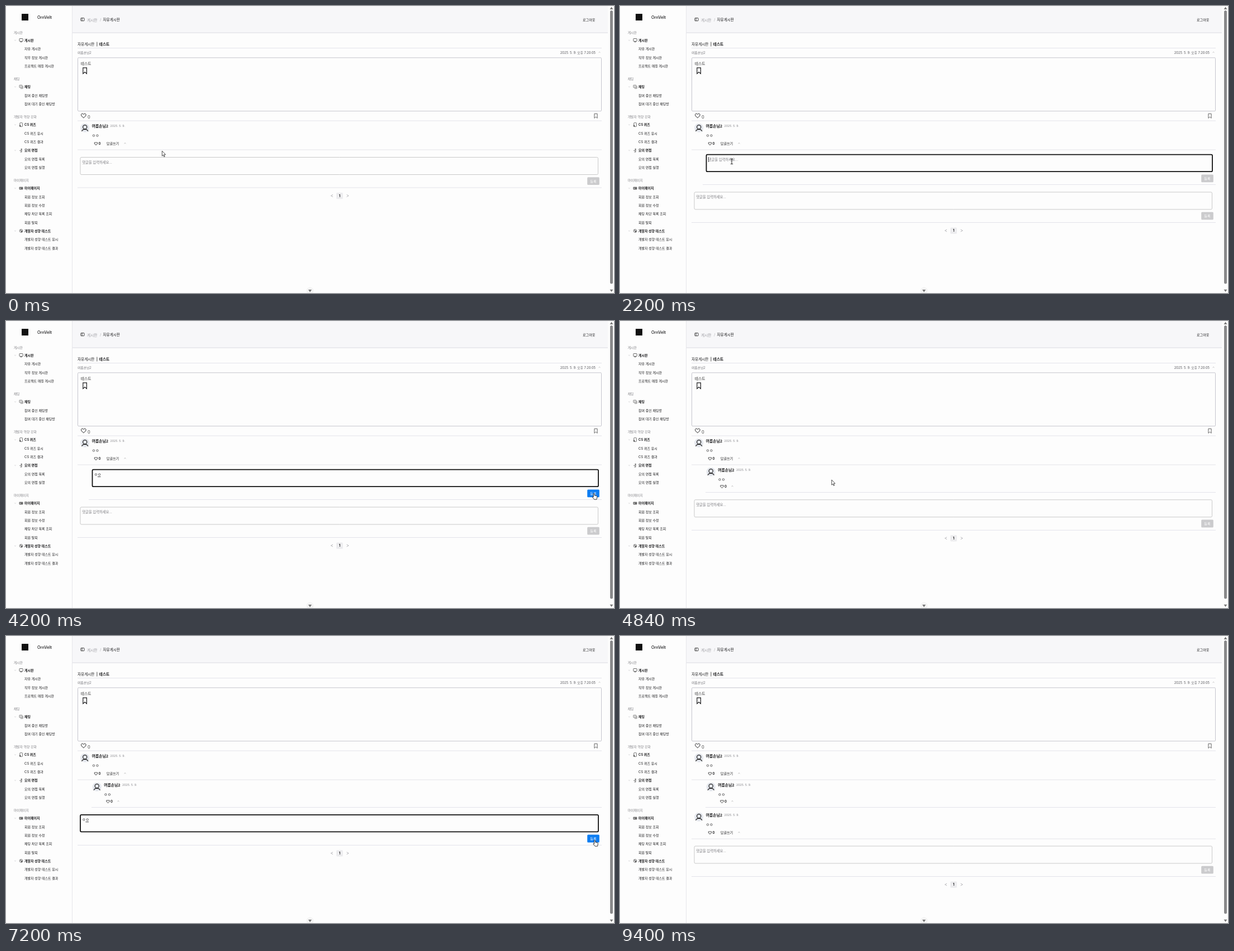
These frames come from a looping animation (1088x515 px, 9.48 s). An HTML page with a canvas:

```html
<!DOCTYPE html>
<html lang="ko">
<head>
<meta charset="utf-8">
<title>자유게시판</title>
<style>
html, body { margin: 0; width: 100%; height: 100%; overflow: hidden; background: #fdfdfd; }
canvas { display: block; width: 1088px; height: 515px; }
</style>
</head>
<body>
<canvas id="stage"></canvas>
<script>
const W = 1088, H = 515, LOOP = 9480;
const FONT = 'Inter, "Noto Sans CJK KR", "Noto Sans CJK JP", "Noto Sans CJK", sans-serif';
const INK = '#1c1c1e', GREY = '#85858a', LINE = '#e3e3ea';
const USER = '여름손님2', HINT = '댓글을 입력하세요...';

const canvas = document.getElementById('stage');
const dpr = window.devicePixelRatio || 1;
canvas.width = W * dpr;
canvas.height = H * dpr;
const c = canvas.getContext('2d');

// Event times in ms
const AT = {
  openReply: 1250, focusReply: 1850, reply1: 3450, reply2: 3740, sendReply: 4300,
  focusMain: 5350, main1: 5900, main2: 6150, sendMain: 7520
};

// Pointer path: time, x, y
const PATH = [
  [0, 279, 260], [120, 279, 260], [700, 189.5, 271.5], [950, 190, 247], [1350, 190, 247],
  [1750, 200, 279], [3250, 200, 279], [3640, 576, 306.5], [3930, 1066, 311],
  [4100, 1052, 309], [4380, 1052, 309], [4840, 378.5, 285], [5200, 215, 333],
  [6250, 215, 333], [6700, 1072, 372], [6950, 1053.5, 366], [7800, 1053.5, 366],
  [8300, 960, 260], [8700, 640, 8], [8850, 600, -20]
];

// ---- helpers ----
function text(s, x, y, size, color = INK, weight = 400, align = 'left') {
  c.font = `${weight} ${size}px ${FONT}`;
  c.textAlign = align;
  c.fillStyle = color;
  c.fillText(s, x, y + size * 0.375);
}

function rect(x, y, w, h, color) {
  c.fillStyle = color;
  c.fillRect(x, y, w, h);
}

function round(x, y, w, h, r, fill, stroke, lw = 1) {
  c.beginPath();
  c.roundRect(x, y, w, h, r);
  paint(fill, stroke, lw);
}

function paint(fill, stroke, lw = 1) {
  if (fill) { c.fillStyle = fill; c.fill(); }
  if (stroke) { c.strokeStyle = stroke; c.lineWidth = lw; c.stroke(); }
}

function poly(pts, fill, stroke, lw, close = true) {
  c.beginPath();
  pts.forEach(([x, y]) => c.lineTo(x, y));
  if (close) c.closePath();
  paint(fill, stroke, lw);
}

function circle(x, y, r, fill, stroke, lw) {
  c.beginPath();
  c.arc(x, y, r, 0, Math.PI * 2);
  paint(fill, stroke, lw);
}

function at(x, y, draw, scale = 1) {
  c.save();
  c.translate(x, y);
  c.scale(scale, scale);
  draw();
  c.restore();
}

const rule = (y, x = 128) => rect(x, y - 0.5, 1066 - x, 1, LINE);

function heart(x, y, w, lw) {
  at(x, y, () => {
    c.beginPath();
    c.moveTo(0, 4);
    c.bezierCurveTo(-2, 2.2, -4.4, 0.6, -4.4, -1.5);
    c.bezierCurveTo(-4.4, -4, -1.2, -4.6, 0, -2.3);
    c.bezierCurveTo(1.2, -4.6, 4.4, -4, 4.4, -1.5);
    c.bezierCurveTo(4.4, 0.6, 2, 2.2, 0, 4);
    paint(null, INK, lw * 8.8 / w);
  }, w / 8.8);
}

function bookmark(x, y, w, h, color, lw) {
  poly([[x, y], [x + w, y], [x + w, y + h], [x + w / 2, y + h * 0.72], [x, y + h]], null, color, lw);
}

function chevron(x, y, color, flip = 1) {
  poly([[x - 1.5, y - 0.7 * flip], [x, y + 0.7 * flip], [x + 1.5, y - 0.7 * flip]], null, color, 0.7, false);
}

// ---- sidebar ----
const ICONS = {
  board() {
    round(-3, -3, 6.2, 4.8, 0.6, null, '#444', 0.8);
    rect(-1.6, 2.7, 3.4, 0.8, '#444');
  },
  chat() {
    round(-3, -3, 5, 4.4, 0.6, null, '#555', 0.7);
    poly([[3.2, -1.2], [3.2, 3], [-1, 3]], null, '#555', 0.7, false);
    rect(-1.7, -1.3, 2.4, 0.7, '#555');
  },
  quiz() {
    round(-2.2, -3.4, 4.6, 6.8, 0.6, null, '#555', 0.8);
    rect(-2.6, 0.6, 1.8, 2.8, '#444');
  },
  mic() {
    circle(0.7, -1.9, 1.2, '#555');
    poly([[-2.6, 0.4], [1.6, 0.4], [0, 3]], null, '#555', 0.9, false);
    rect(-1.5, 2.6, 3, 0.8, '#555');
  },
  card() {
    round(-3.4, -2.2, 6.8, 4.4, 0.6, '#555');
    rect(-2.4, -0.9, 2, 1.8, '#ddd');
    rect(0.5, -0.6, 2, 0.7, '#ddd');
  },
  mind() {
    circle(0, 0, 2.8, '#e4e4e4', '#555', 0.7);
    poly([[-1.4, -2], [0, 0], [1.2, 2.6], [2, -0.5]], null, '#333', 0.9, false);
  }
};

const MENU = [
  [47.5, '게시판'],
  [61.5, '게시판', 'board', ['자유 게시판', '직무 정보 게시판', '프로젝트 매칭 게시판']],
  [131, '채팅'],
  [145, '채팅', 'chat', ['참여 중인 채팅방', '참여 대기 중인 채팅방']],
  [199, '개발자 역량 강화'],
  [213, 'CS 퀴즈', 'quiz', ['CS 퀴즈 응시', 'CS 퀴즈 결과']],
  [259, '모의 면접', 'mic', ['모의 면접 목록', '모의 면접 실행']],
  [313, '마이페이지'],
  [327, '마이페이지', 'card', ['회원 정보 조회', '회원 정보 수정', '채팅 차단 목록 조회', '회원 탈퇴']],
  [403.5, '개발자 성향 테스트', 'mind', ['개발자 성향 테스트 응시', '개발자 성향 테스트 결과']]
];

function sidebar() {
  rect(118, 0, 1, H, '#e6e6ea');
  rect(28, 14, 12, 12, '#111');
  text('OrnVelt', 56, 20.5, 7.3, INK, 500);
  for (const [y, label, icon, items] of MENU) {
    if (!icon) {
      text(label, 13.7, y, 5.9, GREY);
      continue;
    }
    chevron(16.5, y, '#c4c4c8');
    at(27, y, ICONS[icon]);
    text(label, 33, y, 6, INK, 600);
    items.forEach((s, i) => text(s, 33, y + 15.4 * (i + 1), 6));
  }
}

// ---- page ----
function header() {
  rect(119, 0, 958, 48, '#f7f7f9');
  rect(119, 47.5, 958, 1, '#dcdce2');
  round(133.8, 21.5, 6.2, 5.2, 0.8, null, '#333', 0.9);
  rect(135.6, 21.5, 0.9, 5.2, '#333');
  text('게시판', 145, 25, 6.7, '#9a9aa0');
  text('/', 168, 25, 6.5, '#b0b0b4');
  text('자유게시판', 173.5, 25, 6.6, INK, 500);
  text('로그아웃', 1032, 25, 6.1, INK, 500);
}

function post() {
  text('자유게시판', 128, 68.5, 6.6, INK, 500);
  rect(162.4, 64.5, 0.9, 8, '#444');
  text('테스트', 166.8, 68.5, 6.7, INK, 700);
  rule(75.5);
  text(USER, 128, 83.5, 5.8, '#77777c');
  text('2025. 5. 9. 오후 7:20:05', 1055, 83.5, 5.75, '#55555a', 400, 'right');
  chevron(1062, 83, '#aaa', -1);
  round(128.5, 92.8, 937, 95.8, 1.5, '#fdfdfd', '#c6c6ce');
  text('테스트', 133.8, 103.5, 6.8, '#333');
  bookmark(137.8, 110.8, 6.6, 10.6, INK, 1.2);
  heart(138.8, 196.8, 8.6, 1);
  text('0', 146, 199, 7.5, '#444');
  bookmark(1052.9, 193.3, 5.2, 8, '#555', 0.9);
  rule(206);
}

function avatar(x, y) {
  circle(x, y, 8, '#e4e7ed');
  c.beginPath();
  c.arc(x, y - 1.4, 3.6, 0, Math.PI * 2);
  c.moveTo(x - 5.6, y + 6.2);
  c.bezierCurveTo(x - 4.4, y + 1.6, x + 4.4, y + 1.6, x + 5.6, y + 6.2);
  paint(null, '#222', 1.2);
}

function comment(dx, dy, nested) {
  const y = dy + (nested ? -2 : 0);
  avatar(141.2 + dx, 218.7 + dy);
  text(USER, 153.8 + dx, 215.8 + dy, 6.8, INK, 700);
  text('2025. 5. 9.', 186.5 + dx, 215.5 + dy, 5.3, GREY);
  text('ㅇㅇ', 153.8 + dx, 232.3 + dy, 6.9, INK);
  heart(161 + dx, 247 + y, 5.6, 0.9);
  text('0', 165.4 + dx, 247 + y, 6, INK, 600);
  if (!nested) text('답글쓰기', 179.8 + dx, 247 + y, 6.1, INK, 500);
  chevron((nested ? 179.5 : 213) + dx, 246.3 + y, '#999', -1);
}

// Text area with its submit button
function form(x, y, { focus, value = '', composing, ready, caret }) {
  if (focus) round(x + 0.5, y, 1059.5 - x, 30.5, 2, '#fdfdfd', '#111', 1.8);
  else round(x + 0.5, y, 1059 - x, 31, 2, '#fdfdfd', '#c9c9c9');
  const tx = x + 3.7, ty = y + 8.8;
  if (value) {
    text(value, tx, ty, 6.9);
    if (composing) rect(tx + 6.2, ty + 3.7, 5.6, 0.8, INK);
  } else {
    text(HINT, tx, ty, 6.3, '#7c7c80');
  }
  if (caret) rect(tx + value.length * 6.35 + 0.2, ty - 4.5, 0.8, 9, INK);
  round(1040.2, y + 35.8, 21.6, 13.8, 1.5, ready ? '#0d7df2' : '#cbcbcd');
  text('등록', 1051, y + 42.9, 6.2, '#fff', 500, 'center');
}

function pager(y) {
  poly([[585, y - 2], [581.4, y], [585, y + 2]], null, '#a5a5aa', 0.8, false);
  round(591.2, y - 5.6, 11.6, 11.4, 1.5, '#ececee');
  text('1', 597, y + 0.2, 6, INK, 700, 'center');
  poly([[609.6, y - 2], [613.2, y], [609.6, y + 2]], null, '#a5a5aa', 0.8, false);
}

function chrome() {
  rect(1077, 0, 11, H, '#fcfcfc');
  round(1081, 8, 5, 490.5, 2.5, '#88888a');
  poly([[1080.6, 6], [1083.5, 1.6], [1086.4, 6]], '#777');
  poly([[1080.6, 508.7], [1083.5, 513], [1086.4, 508.7]], '#777');
  circle(544, 511, 6.5, '#f4f4f4');
  poly([[541, 509], [547, 509], [544, 513.4]], '#777');
}

// ---- pointer ----
function pointerAt(t) {
  const i = PATH.findIndex(k => k[0] > t);
  if (i < 0) return PATH[PATH.length - 1].slice(1);
  const [t0, x0, y0] = PATH[i - 1], [t1, x1, y1] = PATH[i];
  const u = (t - t0) / (t1 - t0), e = u * u * (3 - 2 * u);
  return [x0 + (x1 - x0) * e, y0 + (y1 - y0) * e];
}

function arrow(x, y) {
  at(x, y, () => poly([[0.3, 0], [0.3, 9.2], [2.4, 7.3], [3.8, 10.6], [5.2, 10], [3.8, 6.8], [6.5, 6.6]],
    '#fff', '#222', 0.8));
}

function beam(x, y) {
  rect(x - 0.5, y - 4.5, 1, 9, '#222');
  rect(x - 2.2, y - 5, 4.4, 0.9, '#222');
  rect(x - 2.2, y + 4.1, 4.4, 0.9, '#222');
}

function hand(x, y) {
  at(x, y, () => {
    c.beginPath();
    c.moveTo(-0.8, 7);
    c.lineTo(-0.8, 0.8);
    c.quadraticCurveTo(0.2, -0.6, 1.2, 0.8);
    c.lineTo(1.2, 4);
    c.lineTo(4.6, 4.6);
    c.quadraticCurveTo(6, 5, 5.8, 7);
    c.lineTo(5, 11.2);
    c.lineTo(0.6, 11.2);
    c.lineTo(-2.8, 7);
    c.quadraticCurveTo(-2.6, 5.6, -0.8, 7);
    paint('#fff', '#222', 0.9);
  });
}

function pointer(t, areas, buttons) {
  const [x, y] = pointerAt(t);
  const inside = ([ax, ay, w, h]) => x >= ax && x <= ax + w && y >= ay && y <= ay + h;
  if (buttons.some(inside)) hand(x, y);
  else if (areas.some(inside)) beam(x, y);
  else arrow(x, y);
}

// ---- one moment ----
function typed(t, one, two) {
  return t >= two ? 'ㅇㅇ' : t >= one ? 'ㅇ' : '';
}

function blink(t, from) {
  return t >= from && (t - from) % 1060 < 530;
}

function draw(t) {
  c.setTransform(dpr, 0, 0, dpr, 0, 0);
  rect(0, 0, W, H, '#fdfdfd');
  sidebar();
  header();
  post();
  comment(0, 0);
  rule(258);

  const replying = t >= AT.openReply && t < AT.sendReply;
  const replied = t >= AT.sendReply, done = t >= AT.sendMain;
  const shift = done ? 105.5 : replied ? 49.3 : replying ? 62.5 : 0;
  const top = 271.5 + shift;
  const areas = [[133, top - 0.5, 927, 32]];
  const buttons = [[179, 242, 24, 10]];

  if (replying) {
    const value = typed(t, AT.reply1, AT.reply2), ready = value.length > 1;
    form(154, 266.7, {
      focus: t >= AT.focusReply, value, ready, composing: ready,
      caret: !value && blink(t, AT.focusReply)
    });
    rule(320.5, 148);
    areas.push([154, 266, 906, 32]);
    if (ready) buttons.push([1040, 302, 22, 14]);
  }
  if (replied) {
    comment(21.5, 52, true);
    rule(307.5, 153);
  }
  if (done) {
    comment(0, 106);
    rule(364);
  }

  const value = done ? '' : typed(t, AT.main1, AT.main2), ready = value.length > 1;
  form(132.5, top, {
    focus: t >= AT.focusMain && !done, value, ready, composing: ready,
    caret: !value && !done && blink(t, AT.focusMain)
  });
  if (ready) buttons.push([1040, top + 36, 22, 14]);
  rule(top + 54.5);
  pager(top + 69);
  chrome();
  pointer(t, areas, buttons);
}

const start = performance.now();
function tick() {
  draw((performance.now() - start) % LOOP);
  requestAnimationFrame(tick);
}
tick();
</script>
</body>
</html>
```
